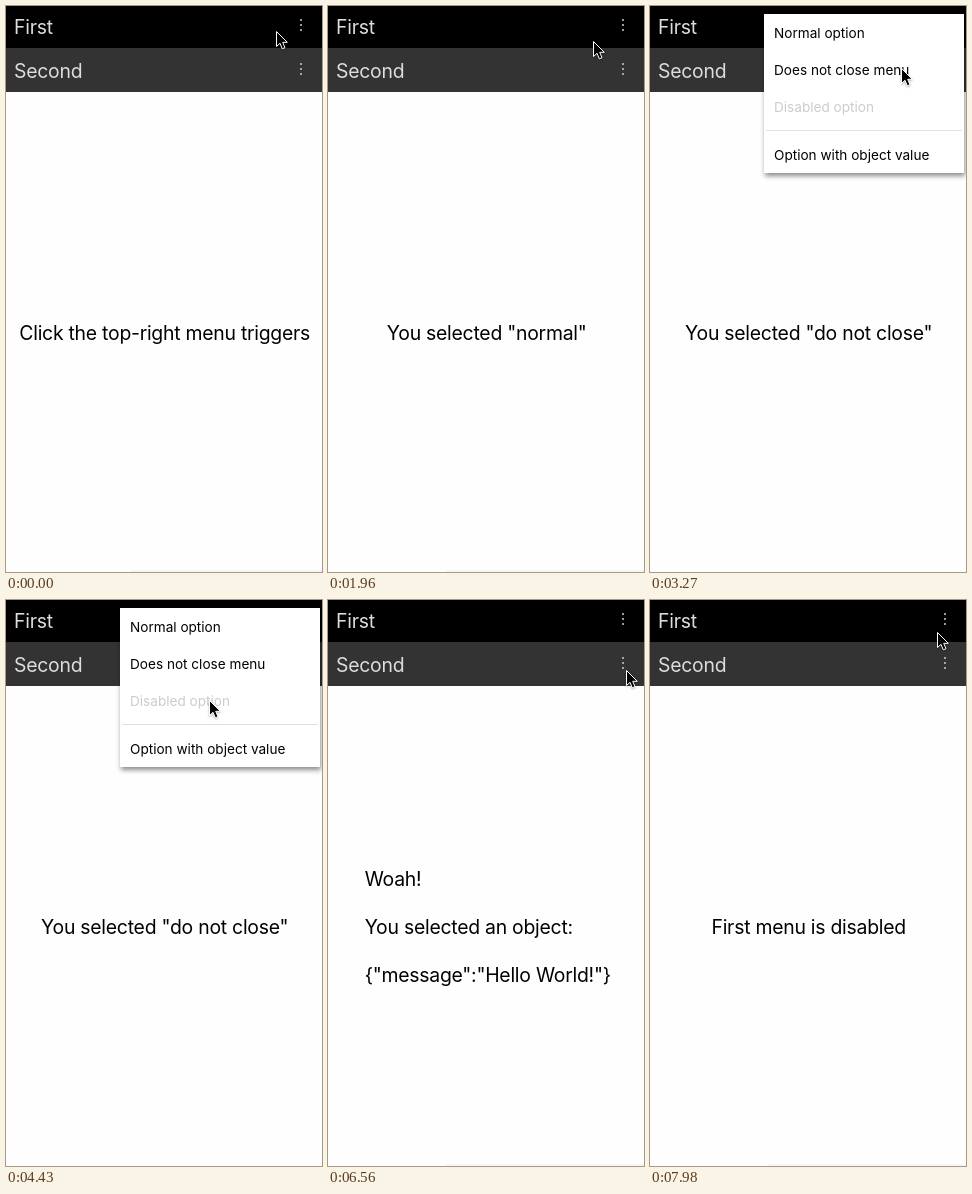
An HTML page for the animation above (8000 ms loop, 316x566 px).

```html
<!DOCTYPE html>
<html lang="en">
<head>
<meta charset="utf-8">
<title>Menu demo</title>
<style>
  html, body { margin: 0; width: 100%; height: 100%; overflow: hidden; background: #fefefe; }
  svg { display: block; width: 316px; height: 566px; }
  text { font: 19.4px Inter, sans-serif; letter-spacing: -.25px; white-space: pre; }
  .bar text { fill: #ddd; }
  .bar circle { fill: #ccc; }
  .menu { filter: drop-shadow(1px 3px 2.5px rgba(0, 0, 0, .45)); }
  .menu rect { fill: #fff; }
  .menu text { font-size: 13.6px; letter-spacing: 0; }
  .menu .disabled { fill: #ccc; }
  .centered { text-anchor: middle; }
</style>
</head>
<body>
<svg viewBox="0 0 316 566">
  <g class="bar">
    <rect width="316" height="42"/>
    <text x="8" y="27.5">First</text>
    <circle cx="295" cy="14" r="1"/><circle cx="295" cy="19" r="1"/><circle cx="295" cy="24" r="1"/>
  </g>
  <g class="bar" transform="translate(0 44)">
    <rect y="-2" width="316" height="44" fill="#333"/>
    <text x="8" y="27.5">Second</text>
    <circle cx="295" cy="14" r="1"/><circle cx="295" cy="19" r="1"/><circle cx="295" cy="24" r="1"/>
  </g>
  <text id="message" class="centered" x="158.7" y="333.5"></text>
  <g id="details">
    <text x="36.7" y="285.5">Woah!</text>
    <text x="36.7" y="333.5">You selected an object:</text>
    <text x="36.7" y="381.5">{"message":"Hello World!"}</text>
  </g>
  <path id="edge" stroke="#eee"/>
  <g id="first" class="menu">
    <rect x="114" y="8" width="200" height="159"/>
    <text x="124" y="31.5">Normal option</text>
    <text x="124" y="68.5">Does not close menu</text>
    <text x="124" y="105.5" class="disabled">Disabled option</text>
    <path d="M116 124.5H312" stroke="#e0e0e0"/>
    <text x="124" y="153.5">Option with object value</text>
  </g>
  <g id="second" class="menu">
    <rect x="114" y="52" width="200" height="37"/>
    <text x="124" y="75.5">disable first menu</text>
  </g>
  <path id="cursor" d="M.5.5V15.5L4 12.3 6.3 17.8 9 16.7 6.7 11.3H11.3Z" stroke="#fff"
        style="filter: drop-shadow(0 1px 1px rgba(0, 0, 0, .3))"/>
</svg>
<script>
const DURATION = 8000;
const $ = id => document.getElementById(id);

// [time, open menu, message]; an empty message shows the object details
const scenes = [
  [0, '', 'Click the top-right menu triggers'],
  [800, 'first', 'Click the top-right menu triggers'],
  [1960, '', 'You selected "normal"'],
  [2570, 'first', 'You selected "normal"'],
  [3270, 'first', 'You selected "do not close"'],
  [5770, '', ''],
  [7000, 'second', ''],
  [7440, '', 'First menu is disabled'],
];

// Pointer moves: [first step, last step, step count, x, y]
const start = [270, 25];
const moves = [
  [270, 620, 5, 289, 28],
  [1610, 1780, 3, 265, 35],
  [2040, 2390, 5, 283, 32],
  [2660, 2740, 2, 252, 68],
  [3010, 3100, 2, 251, 62],
  [4080, 4430, 5, 203, 100],
  [4880, 5140, 4, 189, 143],
  [6030, 6650, 8, 303, 67],
  [7090, 7180, 2, 250, 68],
  [7890, 7980, 2, 287, 32],
];

const ease = p => p * p * (3 - 2 * p);

function pointerAt(time) {
  let [x, y] = start;
  for (const [from, to, count, nextX, nextY] of moves) {
    if (time < from) break;
    const step = Math.floor((time - from) / (to - from) * (count - 1) + .02) + 1;
    const k = ease(Math.min(1, step / count));
    x += (nextX - x) * k;
    y += (nextY - y) * k;
  }
  return [x, y];
}

const show = (id, visible) => $(id).style.display = visible ? '' : 'none';

function draw(time) {
  const [, menu, message] = scenes.findLast(([from]) => time >= from);
  $('message').textContent = message;
  show('details', !message);
  show('first', menu === 'first');
  show('second', menu === 'second');
  show('edge', !menu);
  $('edge').setAttribute('d', `M${time < 800 ? 124 : 118} 565H316`);
  $('cursor').setAttribute('transform', `translate(${pointerAt(time).map(Math.round)})`);
}

const origin = performance.now();
function tick() {
  draw((performance.now() - origin) % DURATION);
  requestAnimationFrame(tick);
}
tick();
</script>
</body>
</html>
```
